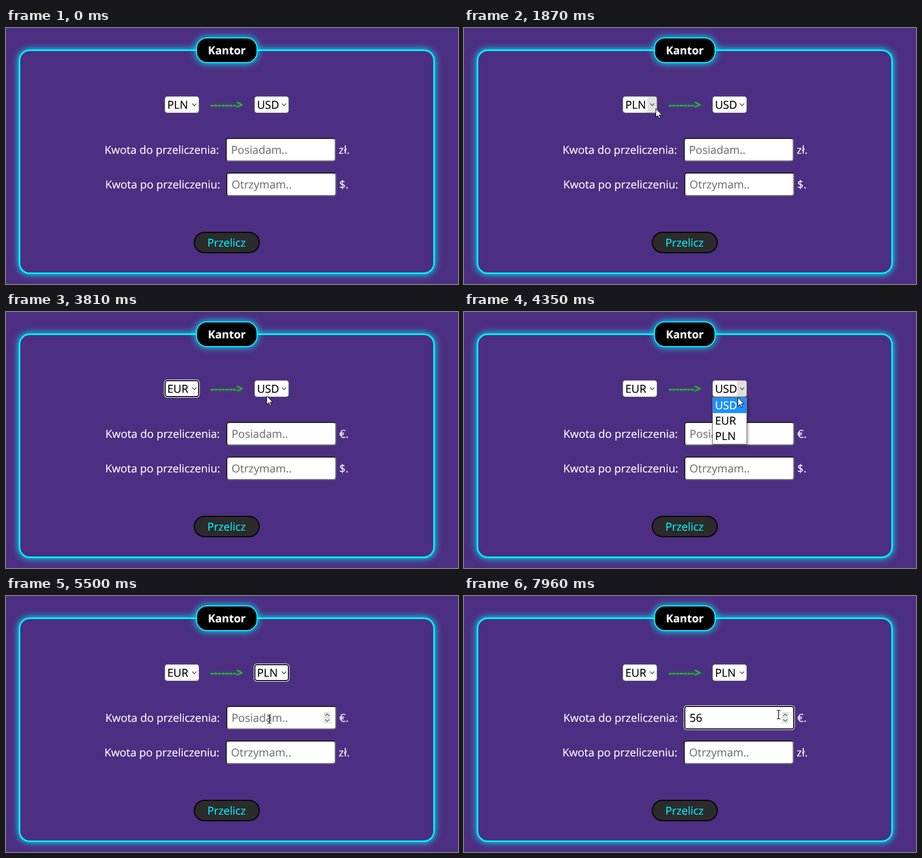
Recreate the animation shown at these times as an HTML page. Size 821 by 466 pixels, loop 8000 ms.

```html
<!DOCTYPE html>
<html lang="pl">
<head>
<meta charset="utf-8">
<title>Kantor</title>
<style>
html, body { margin: 0; width: 100%; height: 100%; overflow: hidden; background: #4c2f82; }
#stage { position: relative; width: 821px; height: 466px; overflow: hidden; color: #fff;
  font: 20px/27px "Open Sans", "Noto Sans", sans-serif; text-rendering: geometricPrecision; }
#stage * { position: absolute; box-sizing: border-box; }
span { white-space: pre; -webkit-text-stroke: .2px; }
.panel, .title { border: 3px solid #00f0ff; border-radius: 20px; box-shadow: 0 0 12.5px #00f0ff; }
.title { border-width: 2px; background: #000; }
.button { border: 2px solid #000; border-radius: 20px; background: #2b2b2b; }
.select { border: 1px solid #767676; border-radius: 5px; background: #fff; }
.input { border: 2px inset #767676; border-radius: 5px; background: #fff; }
.focus { border: 2px solid #101010; box-shadow: 0 0 0 1px #fff; }
.list { border: 1px solid #767676; background: #fff; box-shadow: 1px 2px 6px rgba(0, 0, 0, .45); }
svg { left: 0; top: 0; overflow: visible; }
</style>
</head>
<body>
<div id="stage"></div>
<script>
const stage = document.getElementById('stage');
const LOOP = 8000, BLINK = 500;
const OPEN_FROM = 2270, PICK_FROM = 3100, OPEN_TO = 4050, PICK_TO = 5070;
const FOCUS_INPUT = 5740, KEY_5 = 6930, KEY_6 = 7130;

// Each pointer move eases out from the previous stop
const moves = [
  { from: 760, to: 1540, x: 397, y: 189 },
  { from: 1570, to: 1990, x: 343, y: 141 },
  { from: 2530, to: 2920, x: 327, y: 198 },
  { from: 3390, to: 4050, x: 500, y: 143 },
  { from: 4290, to: 4900, x: 478, y: 219 },
  { from: 5320, to: 5500, x: 478, y: 224 },
  { from: 5730, to: 6210, x: 585, y: 214 },
  { from: 6440, to: 6560, x: 585, y: 220 },
  { from: 6930, to: 7430, x: 571, y: 216 }
];

function pointer(t) {
  let x = 738, y = 467;
  for (const m of moves) {
    const k = Math.max(0, Math.min(1, (t - m.from) / (m.to - m.from)));
    const eased = Math.sin(k * Math.PI / 2);
    x += (m.x - x) * eased;
    y += (m.y - y) * eased;
  }
  return [x, y];
}

const box = (cls, x, y, w, h, style = '') =>
  `<div class="${cls}" style="left:${x}px;top:${y}px;width:${w}px;height:${h}px;${style}"></div>`;
const text = (x, baseline, s, color = '#fff', style = '') =>
  `<span style="left:${x}px;top:${baseline - 21}px;color:${color};${style}">${s}</span>`;
const svg = s => `<svg width="821" height="466">${s}</svg>`;
const chevron = (x, y, r, dy, color) =>
  svg(`<path d="M${x - r} ${y - dy}l${r} ${2 * dy}l${r} ${-2 * dy}" fill="none" stroke="${color}" stroke-width="1.5"/>`);

function select(x, value, hover, focus) {
  return box('select' + (focus ? ' focus' : ''), x, 124, 63, 31) +
    (hover ? box('', x + 45, 125, 17, 29, 'background:#e0e0e0;border-radius:0 4px 4px 0') : '') +
    text(x + 5, 147, value, '#000') + chevron(x + 54, 139.5, 3.7, 1.9, '#555');
}

function list(x, items, active) {
  return box('list', x, 155, 63, 86) + items.map((item, i) =>
    (i === active ? box('', x + 1, 156 + 28 * i, 61, 28, 'background:#1e90ff') : '') +
    text(x + 5, 177 + 28 * i, item, i === active ? '#fff' : '#000')).join('');
}

// A row is centred, so a wider unit shifts it to the left
function row(y, labelX, label, unit, content, color, focus) {
  const wide = unit === 'zł.', x = wide ? 399 : 400;
  return text(labelX - (wide ? 1.5 : 0), y + 29, label) +
    box('input' + (focus ? ' focus' : ''), x, y, 200, 43) +
    text(x + 9.8, y + 29, content, color) + text(x + 205.3, y + 29, unit);
}

function spinner(hover) {
  const color = hover ? '#222' : '#666';
  return box('', 577, 211, 13, 21, `background:${hover ? '#d6d6d6' : '#e6e6e6'}`) +
    chevron(583.5, 216.5, 3.5, -1.7, color) + chevron(583.5, 226.5, 3.5, 1.7, color);
}

function cursor(x, y, beam) {
  const shape = beam
    ? '<path d="M-3 -7.5H4M.5 -7.5V7.5M-3 7.5H4" fill="none" stroke="#000" stroke-width="1.2"/>'
    : '<path d="M.5 .8V16.6L4.2 13.1L6.6 18.6L9 17.5L6.6 12.2H11.6Z" fill="#fff" stroke="#000"/>';
  return svg(`<g transform="translate(${Math.round(x)} ${Math.round(y)})">${shape}</g>`);
}

function draw(t) {
  const [x, y] = pointer(t);
  const fromPicked = t >= PICK_FROM, toPicked = t >= PICK_TO;
  const focused = t >= FOCUS_INPUT;
  const typed = t >= KEY_6 ? '56' : t >= KEY_5 ? '5' : '';
  const onSpinner = x >= 577;
  const inInput = toPicked && y > 200 && y < 243;
  const lastKey = t >= KEY_6 ? KEY_6 : t >= KEY_5 ? KEY_5 : FOCUS_INPUT;
  const caret = focused && Math.floor((t - lastKey) / BLINK) % 2 === 0;
  const active = Math.max(0, Math.min(2, Math.floor((y - 156) / 28)));

  let out = box('panel', 23, 39, 756, 409) + box('title', 345, 17, 112, 47) +
    text(366.7, 48, 'Kantor', '#fff', 'font-weight:700') +
    select(288, fromPicked ? 'EUR' : 'PLN', t > 1840 && !fromPicked, fromPicked && t < OPEN_TO) +
    text(371.3, 148, '-------&gt;', '#2ec52e', 'font-size:21px;font-weight:600;text-shadow:0 0 5px #1f9a4a') +
    select(451, toPicked ? 'PLN' : 'USD', t > 3830 && !toPicked, toPicked && !focused) +
    row(200, 180.6, 'Kwota do przeliczenia:', fromPicked ? '€.' : 'zł.',
      typed || 'Posiadam..', typed ? '#000' : '#757575', focused) +
    row(263, 180.2, 'Kwota po przeliczeniu:', toPicked ? 'zł.' : '$.', 'Otrzymam..', '#757575') +
    box('button', 341, 371, 120, 39) + text(365.7, 398, 'Przelicz', '#00f0ff');

  if (inInput) out += spinner(onSpinner);
  if (caret) out += box('', 410 + 11.4 * typed.length, 210, 1, 23, 'background:#000');
  if (t >= OPEN_FROM && !fromPicked) out += list(288, ['PLN', 'EUR', 'USD'], active);
  if (t >= OPEN_TO && !toPicked) out += list(451, ['USD', 'EUR', 'PLN'], active);
  if (t >= 760) out += cursor(x, y, inInput && !onSpinner);
  stage.innerHTML = out;
}

const start = performance.now();
function tick() {
  draw((performance.now() - start) % LOOP);
  requestAnimationFrame(tick);
}
tick();
</script>
</body>
</html>
```
